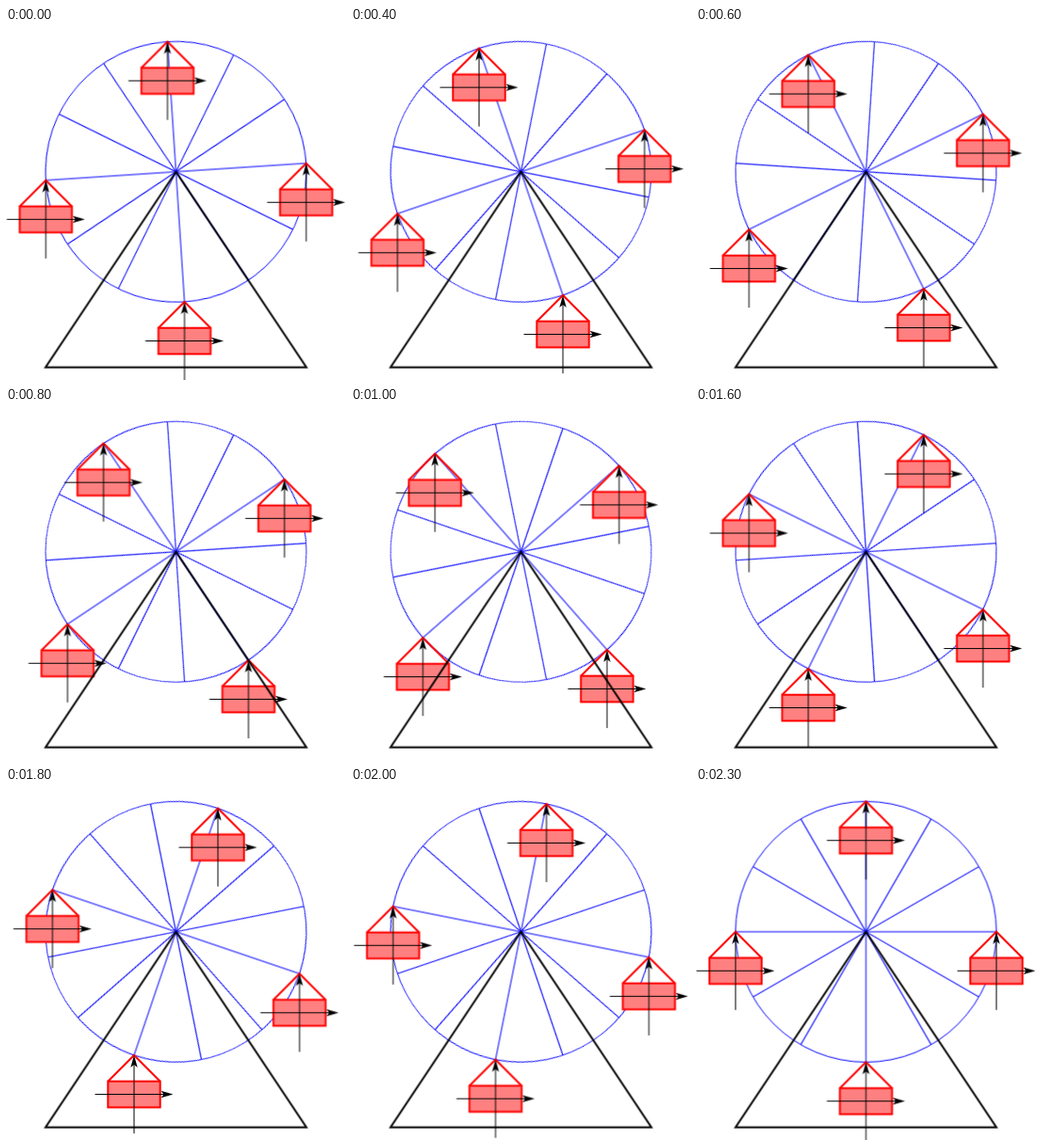
These frames come from a looping animation (360x374 px, 2.4 s). An HTML page:

```html
<!DOCTYPE html>
<html lang="en">
<head>
<meta charset="utf-8">
<title>Ferris wheel</title>
<style>
  html, body { margin: 0; width: 360px; height: 374px; overflow: hidden; background: #fff; }
  svg { display: block; }
  .wheel { fill: none; stroke: #00f; stroke-width: 1; }
  .car { fill: none; stroke: #f00; stroke-width: 2; }
  .axis { stroke: #000; stroke-width: 1; }
  .tower { fill: none; stroke: #000; stroke-width: 2; }
  /* a quarter turn in 24 jumps, then the four-fold symmetry repeats */
  .turn { animation: turn 2.4s steps(24) infinite; }
  .level { animation: level 2.4s steps(24) infinite; }
  @keyframes turn { from { transform: rotate(-3.75deg); } to { transform: rotate(-93.75deg); } }
  @keyframes level { from { transform: rotate(3.75deg); } to { transform: rotate(93.75deg); } }
</style>
</head>
<body>
<svg width="360" height="374" viewBox="0 0 360 374">
  <defs>
    <path id="spoke" d="M0 -138.5V138.5"/>
    <path id="head" d="M0 0L-13 3.7L-10 0L-13 -3.7Z"/>
    <g id="cabin">
      <g class="car">
        <path d="M-27.7 27.7L0 0L27.7 27.7"/>
        <rect x="-27.7" y="27.7" width="55.4" height="27.7" fill="#ff8080"/>
      </g>
      <path class="axis" d="M-41.5 41.5H33M0 83.1V8"/>
      <use href="#head" transform="translate(41.5 41.5)"/>
      <use href="#head" transform="rotate(-90)"/>
    </g>
  </defs>
  <g transform="translate(180.5 152.75)">
    <g class="turn">
      <g class="wheel">
        <circle r="138.5"/>
        <use href="#spoke"/>
        <use href="#spoke" transform="rotate(30)"/>
        <use href="#spoke" transform="rotate(60)"/>
        <use href="#spoke" transform="rotate(90)"/>
        <use href="#spoke" transform="rotate(120)"/>
        <use href="#spoke" transform="rotate(150)"/>
      </g>
      <g transform="translate(0 -138.5)"><g class="level"><use href="#cabin"/></g></g>
      <g transform="translate(138.5 0)"><g class="level"><use href="#cabin"/></g></g>
      <g transform="translate(0 138.5)"><g class="level"><use href="#cabin"/></g></g>
      <g transform="translate(-138.5 0)"><g class="level"><use href="#cabin"/></g></g>
    </g>
    <path class="tower" d="M0 0L138.5 207.75H-138.5Z"/>
  </g>
</svg>
</body>
</html>
```
